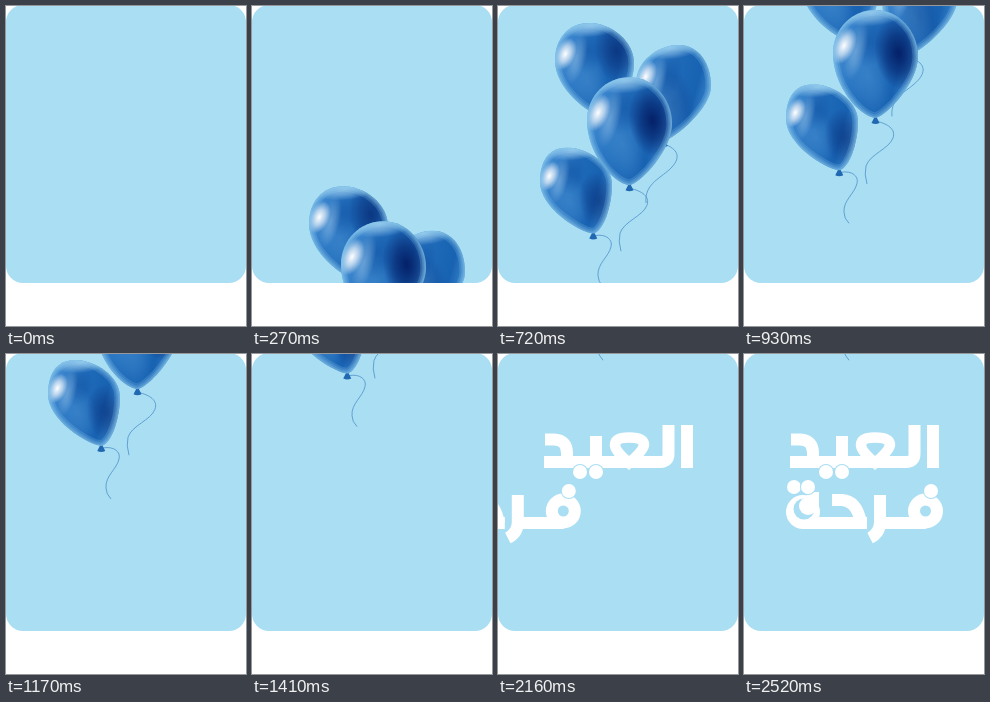
An HTML page with a canvas that plays this animation: 240 px wide and 320 px high, repeating every 2.72 s.

```html
<!DOCTYPE html>
<html lang="ar">
<head>
<meta charset="utf-8">
<title>العيد فرحة</title>
<style>
html, body { margin: 0; width: 100%; height: 100%; overflow: hidden; background: #fff; }
canvas { display: block; width: 240px; height: 320px; }
</style>
</head>
<body>
<canvas id="stage" width="240" height="320" role="img" aria-label="العيد فرحة"></canvas>
<script>
const ctx = document.getElementById('stage').getContext('2d');
const SKY = '#a9def3';
const LOOP = 2720, STEP = 30, LAST_STEP = 84, BALLOONS_END = 1630;

// Tops are given at time 0; speed is in pixels per millisecond.
const balloons = [
  { x: 57, w: 79, h: 94, top: 278, speed: 0.3625, tip: 0.63, shade: [0.78, 0.3], depth: 0.65 },
  { x: 138, w: 75, h: 96, top: 336, speed: 0.4125, tip: 0.37, shade: [0.5, 0.6], depth: 0.2,
    string: 'M28 99 C42 104 45 112 36 122 C26 133 8 138 10 158' },
  { x: 42, w: 72, h: 86, top: 358.7, speed: 0.3015, tip: 0.74, shade: [0.82, 0.62], depth: 0.5,
    string: 'M55 88 C66 86 73 92 71 99 C69 109 57 116 58 128 Q58 134 63 139' },
  { x: 89, w: 85, h: 108, top: 301.6, speed: 0.32, tip: 0.5, shade: [0.77, 0.4], depth: 1,
    string: 'M43 111 C55 114 63 119 60 128 C56 139 37 144 33 156 Q31 164 34 174' }
];

function balloonPath(w, h, tip) {
  const p = new Path2D(), k = tip * w, top = w * (1 - 0.5 * tip - 0.25);
  p.moveTo(top, 0);
  p.bezierCurveTo(top + w * 0.27, 0, w, h * 0.19, w, h * 0.43);
  p.bezierCurveTo(w, h * 0.66, k + w * 0.15, h * 0.97, k, h);
  p.bezierCurveTo(k - w * 0.2, h * 0.98, 0, h * 0.7, 0, h * 0.4);
  p.bezierCurveTo(0, h * 0.17, top - w * 0.27, 0, top, 0);
  return p;
}

// Soft elliptical patch of one "r,g,b" colour.
function glow(x, y, rx, ry, turn, rgb, alpha) {
  ctx.save();
  ctx.translate(x, y);
  ctx.rotate(turn);
  ctx.scale(rx, ry);
  const g = ctx.createRadialGradient(0, 0, 0, 0, 0, 1);
  g.addColorStop(0, `rgba(${rgb},${alpha})`);
  g.addColorStop(0.5, `rgba(${rgb},${alpha * 0.6})`);
  g.addColorStop(1, `rgba(${rgb},0)`);
  ctx.fillStyle = g;
  ctx.fillRect(-1, -1, 2, 2);
  ctx.restore();
}

function shadeBody(b) {
  const { w, h } = b;
  const base = ctx.createLinearGradient(0, h * 0.3, w, h * 0.5);
  [[0, '#4a93d6'], [0.25, '#2f7bc6'], [0.5, '#1e69b8'], [0.8, '#1862b2'], [1, '#3a85cb']]
    .forEach(([at, color]) => base.addColorStop(at, color));
  ctx.fillStyle = base;
  ctx.fillRect(0, 0, w, h);

  glow(w * 0.42, h * 0.62, w * 0.24, h * 0.36, -0.2, '78,150,214', 0.5);
  glow(w * 0.42, h * 0.3, w * 0.2, h * 0.24, 0.2, '14,80,160', 0.5);
  glow(w * b.shade[0], h * b.shade[1], w * 0.28, h * 0.34, -0.15, '4,32,104', b.depth);
  glow(w * 0.45, h * 0.03, w * 0.42, h * 0.12, -0.08, '170,215,243', 0.75);
  glow(w * 0.27, h * 0.38, w * 0.12, h * 0.28, 0.25, '190,222,245', 0.4);
  glow(w * 0.13, h * 0.33, w * 0.13, h * 0.18, 0.4, '255,255,255', 1);
}

function drawBalloon(b, time) {
  const { w, h } = b, knot = b.tip * w;
  ctx.save();
  ctx.translate(b.x, b.top - b.speed * Math.min(time, BALLOONS_END));
  if (b.string) {
    ctx.strokeStyle = '#4a8bc6';
    ctx.lineWidth = 0.75;
    ctx.stroke(new Path2D(b.string));
  }
  ctx.fillStyle = '#2168b2';
  ctx.fill(new Path2D(`M${knot - 1} ${h - 1} h2 l3 6 q-4 2 -8 0 z`));

  const body = balloonPath(w, h, b.tip);
  ctx.save();
  ctx.clip(body);
  shadeBody(b);
  // Overlapping strokes let the rim fade towards the sky.
  ctx.strokeStyle = 'rgba(150,207,240,.2)';
  for (const width of [2, 4, 7, 11]) {
    ctx.lineWidth = width;
    ctx.stroke(body);
  }
  ctx.restore();
  ctx.restore();
}

function strokePath(d, width = 12) {
  ctx.lineWidth = width;
  ctx.stroke(new Path2D(d));
}

function disc(x, y, r, color = '#fff') {
  ctx.fillStyle = color;
  ctx.beginPath();
  ctx.arc(x, y, r, 0, Math.PI * 2);
  ctx.fill();
}

function dot(x, y) {
  disc(x, y, 8, SKY);
  disc(x, y, 7);
}

function drawFirstWord() {
  strokePath('M189 71 V114');
  strokePath('M170.5 71 V100 Q170.5 108 162 108 H46');
  strokePath('M131 109 Q117 97 117 91 Q117 83.5 131 83.5 Q146 83.5 146 91 Q145 97 131 109 Z', 10.5);
  strokePath('M98 82 V108');
  strokePath('M47 85.5 H56 Q69 86 69 99 V108');
  dot(82, 118);
  dot(98, 118);
}

function drawSecondWord() {
  strokePath('M193 157 A11.5 11.5 0 1 0 170 157 A11.5 11.5 0 1 0 193 157 Z');
  strokePath('M182 169 H136');
  strokePath('M136 141 V168 Q136 179 126 184');
  strokePath('M88 146 H98 Q113 147 117 169');
  strokePath('M123 169 H58');
  disc(59, 158, 17);
  ctx.fillRect(63, 138, 12, 37);
  disc(60, 155, 10.5, SKY);
  disc(64, 152, 9);
  dot(187, 137);
  dot(50, 133);
  dot(64, 133);
}

// Slides in from the left, runs 20 px past its place, then settles.
function slide(step, start, from) {
  const n = step - start;
  if (n <= 10) return from + (20 - from) * n / 10;
  return 20 * Math.max(0, 1 - (n - 10) / 6);
}

function drawWord(draw, step, start, from) {
  if (step <= start) return;
  ctx.save();
  ctx.translate(slide(step, start, from), 0);
  ctx.strokeStyle = '#fff';
  ctx.fillStyle = '#fff';
  draw();
  ctx.restore();
}

function render(now) {
  const step = Math.min(LAST_STEP, Math.floor((now % LOOP) / STEP));
  ctx.fillStyle = '#fff';
  ctx.fillRect(0, 0, 240, 320);
  ctx.save();
  ctx.beginPath();
  ctx.roundRect(0, -1, 240, 278, 17);
  ctx.fillStyle = SKY;
  ctx.fill();
  ctx.clip();
  if (step > 0) balloons.forEach(b => drawBalloon(b, step * STEP));
  drawWord(drawFirstWord, step, 56, -195);
  drawWord(drawSecondWord, step, 68, -207);
  ctx.restore();
}

const began = performance.now();
function tick() {
  render(performance.now() - began);
  requestAnimationFrame(tick);
}
tick();
</script>
</body>
</html>
```
